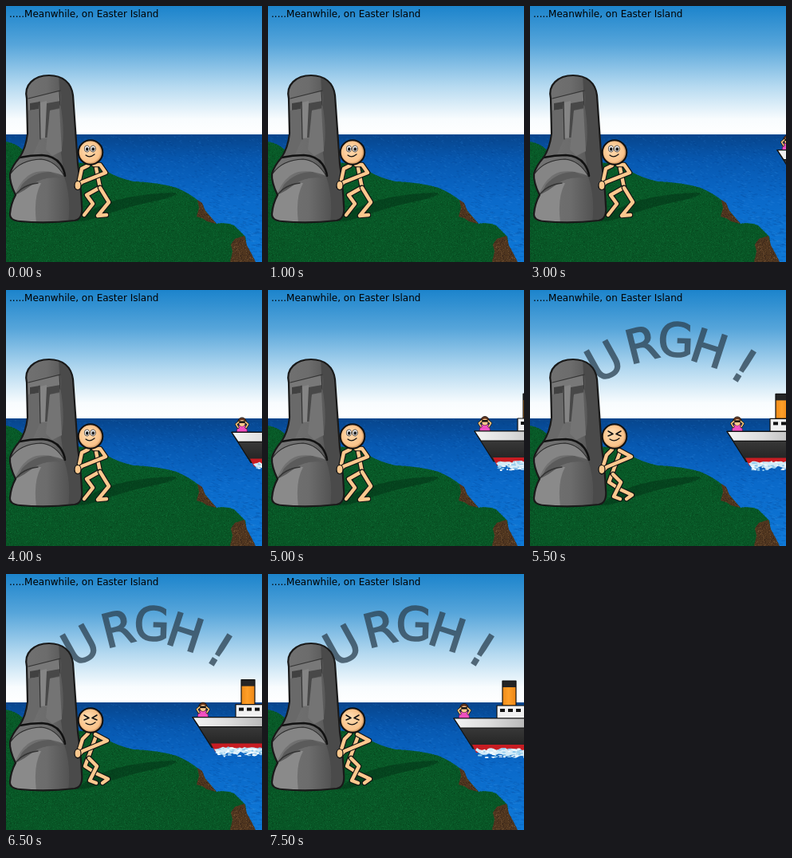
An HTML page with a canvas that plays this animation: 321 px wide and 321 px high, repeating every 8000 ms.

```html
<!DOCTYPE html>
<html lang="en">
<head>
<meta charset="utf-8">
<title>Easter Island</title>
<style>
html, body { margin: 0; width: 100%; height: 100%; overflow: hidden; }
canvas { display: block; width: 321px; height: 321px; }
</style>
</head>
<body>
<canvas id="stage" width="321" height="321"></canvas>
<script>
const SIZE = 321, LOOP = 8000, STEP = 500;
const INK = '#111', SKIN = '#fcc88e';
const stage = document.getElementById('stage').getContext('2d');

function random(seed) {
  return () => {
    seed = (seed * 1664525 + 1013904223) >>> 0;
    return seed / 4294967296;
  };
}

function layer(paint) {
  const c = document.createElement('canvas');
  c.width = c.height = SIZE;
  paint(c.getContext('2d'));
  return c;
}

function ramp(g, x0, y0, x1, y1, ...stops) {
  const r = g.createLinearGradient(x0, y0, x1, y1);
  stops.forEach(([at, color]) => r.addColorStop(at, color));
  return r;
}

function shape(g, d, fill, stroke, width = 1) {
  const p = new Path2D(d);
  if (fill) { g.fillStyle = fill; g.fill(p); }
  if (stroke) {
    g.lineWidth = width;
    g.lineJoin = g.lineCap = 'round';
    g.strokeStyle = stroke;
    g.stroke(p);
  }
}

function disc(g, x, y, rx, ry, fill, stroke, width = 1) {
  g.beginPath();
  g.ellipse(x, y, rx, ry, 0, 0, Math.PI * 2);
  if (fill) { g.fillStyle = fill; g.fill(); }
  if (stroke) { g.strokeStyle = stroke; g.lineWidth = width; g.stroke(); }
}

function speckle(g, d, seed, count, colors) {
  const rnd = random(seed);
  g.save();
  g.clip(new Path2D(d));
  for (let i = 0; i < count; i++) {
    g.fillStyle = colors[i % colors.length];
    g.fillRect(Math.floor(rnd() * SIZE), 165 + Math.floor(rnd() * 156), 1, 1);
  }
  g.restore();
}

function paintSkyAndSea(g) {
  g.fillStyle = ramp(g, 0, 0, 0, 161, [0, '#1c84cc'], [.3, '#56a5da'], [.62, '#b4d9f0'], [.88, '#f8fcfe'], [1, '#fff']);
  g.fillRect(0, 0, SIZE, 161);
  g.fillStyle = ramp(g, 0, 161, 0, SIZE, [0, '#07458c'], [.2, '#0758b0'], [.5, '#0a69c9'], [1, '#0e79d8']);
  g.fillRect(0, 161, SIZE, 160);
  const rnd = random(7);
  for (let i = 0; i < 3200; i++) {
    const depth = rnd(), x = rnd() * SIZE, y = 162 + depth * 159;
    g.strokeStyle = i % 2 ? 'rgba(3,50,120,.2)' : 'rgba(60,150,230,.2)';
    g.lineWidth = .7 + depth * .4;
    g.beginPath();
    g.moveTo(x, y);
    g.lineTo(x + 2 + depth * 3, y + rnd() * 2 - .4);
    g.stroke();
  }
}

function paintLand(g) {
  const grass = 'M0 170Q12 172 22 181L88 196Q112 198 124 205Q134 214 160 220Q190 221 214 228Q230 235 241 244Q250 258 264 273Q277 271 286 275L300 289L304 321H0Z';
  const cliffs = 'M240 243L246 247L250 257L264 273L252 270L246 266L239 264L242 253ZM299 288L302 300L308 311L313 321H281L284 308L282 299L287 292Z';
  shape(g, grass, ramp(g, 0, 170, 0, SIZE, [0, '#085a28'], [1, '#085626']));
  speckle(g, grass, 21, 16000, ['#064b20', '#0c652f', '#075022', '#0a5f2b']);
  shape(g, cliffs, '#50361f');
  speckle(g, cliffs, 33, 14000, ['#38251a', '#694a2d', '#442d1b']);
  shape(g, 'M88 270Q112 249 145 242Q180 234 213 234Q216 238 190 244Q155 251 126 261Q104 270 88 270Z', 'rgba(0,38,18,.42)');
}

function paintStatue(g) {
  const body = 'M26 116C22 99 35 87 54 87C71 87 82 96 84 112Q87 156 90 198Q94 226 95 250Q97 267 86 269Q50 273 18 270Q4 269 5 260Q6 248 12 237Q4 221 5 210Q8 200 17 190Q25 178 27 160Z';
  shape(g, body, ramp(g, 8, 0, 94, 0, [0, '#747474'], [.5, '#6c6c6c'], [.8, '#555'], [1, '#484848']));
  g.save();
  g.clip(new Path2D(body));
  shape(g, 'M66 86Q84 90 85 112L91 200L98 272H78Q82 240 73 214L69 184Q75 160 68 122Z', '#4a4a4a');
  shape(g, 'M26 117L68 107L69 124L28 131Z', '#787878');
  shape(g, 'M30 122L42 120L41 129L30 131Z', '#414141');
  shape(g, 'M28 131L42 129L42 168L34 186L18 190Z', '#696969');
  shape(g, 'M43 121L51 119L53 165L43 166Z', '#858585');
  shape(g, 'M51 122L68 119L67 128L55 131L53 165L49 165Z', '#484848');
  shape(g, 'M55 131L67 129L70 182L58 188L50 180Z', '#747474');
  shape(g, 'M5 212Q18 192 44 193Q64 194 73 213Q54 205 38 208Q20 213 11 237Z', '#858585');
  shape(g, 'M10 240Q21 220 44 222Q34 240 38 272H4Z', '#8a8a8a');
  shape(g, 'M20 224Q34 208 56 208L71 216Q47 213 33 224Q24 231 14 236Z', '#5b5b5b');
  g.restore();
  shape(g, 'M28 116L68 106M42 120L43 167M67 107L68 124', null, '#333', 1.2);
  shape(g, 'M17 190Q31 187 45 187Q61 188 68 198Q73 205 74 213', null, INK, 2.6);
  shape(g, 'M6 210Q18 193 44 192Q62 194 73 213', null, '#2b2b2b', 1.2);
  shape(g, 'M11 238Q21 224 40 222', null, '#333', 1.4);
  shape(g, body, null, '#191919', 2.2);
}

const cry = [['U', 93, 89, -29], ['R', 140, 68, -14], ['G', 183, 62, 2], ['H', 225, 73, 18], ['!', 269, 95, 32]];

function paintCry(g) {
  g.font = '58px "DejaVu Sans", Verdana, sans-serif';
  g.textAlign = 'center';
  g.fillStyle = g.strokeStyle = '#2d4252';
  g.lineWidth = 1.8;
  for (const [ch, x, y, turn] of cry) {
    g.save();
    g.translate(x, y);
    g.rotate(turn * Math.PI / 180);
    g.fillText(ch, 0, 21);
    g.strokeText(ch, 0, 21);
    g.restore();
  }
}

const back = layer(paintSkyAndSea);
const shout = layer(paintCry);
const front = layer(g => { paintLand(g); paintStatue(g); });

function limb(d) {
  shape(stage, d, null, INK, 6.6);
  shape(stage, d, null, SKIN, 4.4);
}

function drawMan(strain) {
  const g = stage;
  const limbs = strain
    ? ['M103 200L96 207L92 220', 'M113 203L102 233', 'M102 233L99 241L113 250L128 257L121 262',
       'M104 231L114 241L105 259L113 262', 'M112 201L127 209L96 222L90 228']
    : ['M103 200L95 204L92 218', 'M113 203L118 228', 'M117 228L101 237L109 248L98 262',
       'M118 228L129 246L115 263L126 262', 'M110 199L118 199L125 209L95 221L89 227'];
  limbs.forEach(limb);
  disc(g, 90, 225, 4, 5.5, SKIN, INK, 1.2);

  const skin = g.createRadialGradient(102, 179, 3, 106, 184, 16);
  skin.addColorStop(0, '#ffd9ac');
  skin.addColorStop(.75, '#fac38a');
  skin.addColorStop(1, '#9a6537');
  disc(g, 106, 183.5, 15.3, 15.3, skin, INK, 2);

  if (strain) {
    shape(g, 'M98 177L104 180.5L98 183M114 177L108 180.5L114 183', null, INK, 1.5);
    shape(g, 'M100 187Q106 191 112 186', null, INK, 1.2);
  } else {
    for (const x of [101.5, 109]) {
      disc(g, x, 179, 3.2, 4, '#fff', INK, .7);
      disc(g, x + .2, 179.5, 1.7, 2.2, INK);
    }
    shape(g, 'M100 187Q105 191 111 186', null, INK, 1.2);
  }
}

// Passenger watching through binoculars
function drawWoman() {
  const g = stage;
  shape(g, 'M8 -8Q13 -11 18 -8L20 1H6Z', '#f04fc0', '#6b1650', .8);
  disc(g, 13, -13, 5.3, 5.5, '#62351f', INK, .8);
  disc(g, 13, -11.5, 3.6, 4, SKIN);
  const arms = 'M8 -6L5.5 -10L9 -13M18 -6L20.5 -10L17 -13';
  shape(g, arms, null, INK, 3);
  shape(g, arms, null, '#eec07a', 1.8);
  g.fillStyle = INK;
  g.fillRect(9.5, -14, 7, 2.5);
}

const shipX = [322, 310, 297, 283, 271, 259, 247, 240, 234, 233, 233];

function drawShip(k) {
  if (k < 5) return;
  const g = stage;
  g.save();
  g.translate(shipX[k - 5], 179 + 2 * Math.cos((k - 5) * Math.PI / 5));
  drawWoman();

  g.fillStyle = ramp(g, 61, 0, 78, 0, [0, '#ed8a18'], [.45, '#ff9f28'], [1, '#ec8616']);
  g.fillRect(61, -41, 17, 26);
  g.fillStyle = '#252525';
  g.fillRect(61, -47, 17, 8);
  g.strokeStyle = INK;
  g.lineWidth = 1.2;
  g.strokeRect(61, -47, 17, 31);
  g.fillStyle = '#f0f0f0';
  g.fillRect(54, -16, 90, 17);
  g.strokeRect(54, -16, 90, 17);
  g.fillStyle = INK;
  for (let x = 58; x < 100; x += 10) g.fillRect(x, -12, 6, 4);

  shape(g, 'M0 0H110V38H24Z', ramp(g, 0, 10, 0, 35, [0, '#3a3a3a'], [1, '#242424']), INK, 1.2);
  shape(g, 'M0 0H110V12H8Z', ramp(g, 0, 0, 90, 8, [0, '#f4f4f4'], [.5, '#dcdcdc'], [1, '#b8b8b8']), INK, 1.2);
  shape(g, 'M23 33H110V43H28Z', '#c71c22');

  // Foam along the waterline, reshuffled on every step
  const rnd = random(90 + k * 131);
  let foam = 'M27 40';
  for (let x = 29; x <= 104; x += 3) foam += `L${x} ${37 + rnd() * 3}`;
  for (let x = 104; x >= 32; x -= 4) foam += `L${x} ${43 + rnd() * 5}`;
  shape(g, foam + 'Z', '#d3ebf8');
  for (let i = 0; i < 70; i++) {
    disc(g, 30 + rnd() * 72, 38 + rnd() * 11, 1 + rnd() * 2, .5 + rnd() * .7, i % 2 ? '#f6fcff' : '#8fc9ec');
  }
  g.restore();
}

function drawCry() {
  stage.globalAlpha = .76;
  stage.drawImage(shout, 0, 0);
  stage.globalAlpha = 1;
}

function drawTitle() {
  stage.font = '12px "DejaVu Sans", Verdana, sans-serif';
  stage.fillStyle = '#000';
  stage.fillText('.....Meanwhile, on Easter Island', 4, 14);
}

function draw(now) {
  const k = Math.floor((now % LOOP) / STEP);
  const strain = k % 2 === 1;
  stage.drawImage(back, 0, 0);
  drawShip(k);
  if (strain) drawCry();
  stage.drawImage(front, 0, 0);
  drawMan(strain);
  drawTitle();
}

const start = performance.now();
function tick() {
  draw(performance.now() - start);
  requestAnimationFrame(tick);
}
tick();
</script>
</body>
</html>
```
